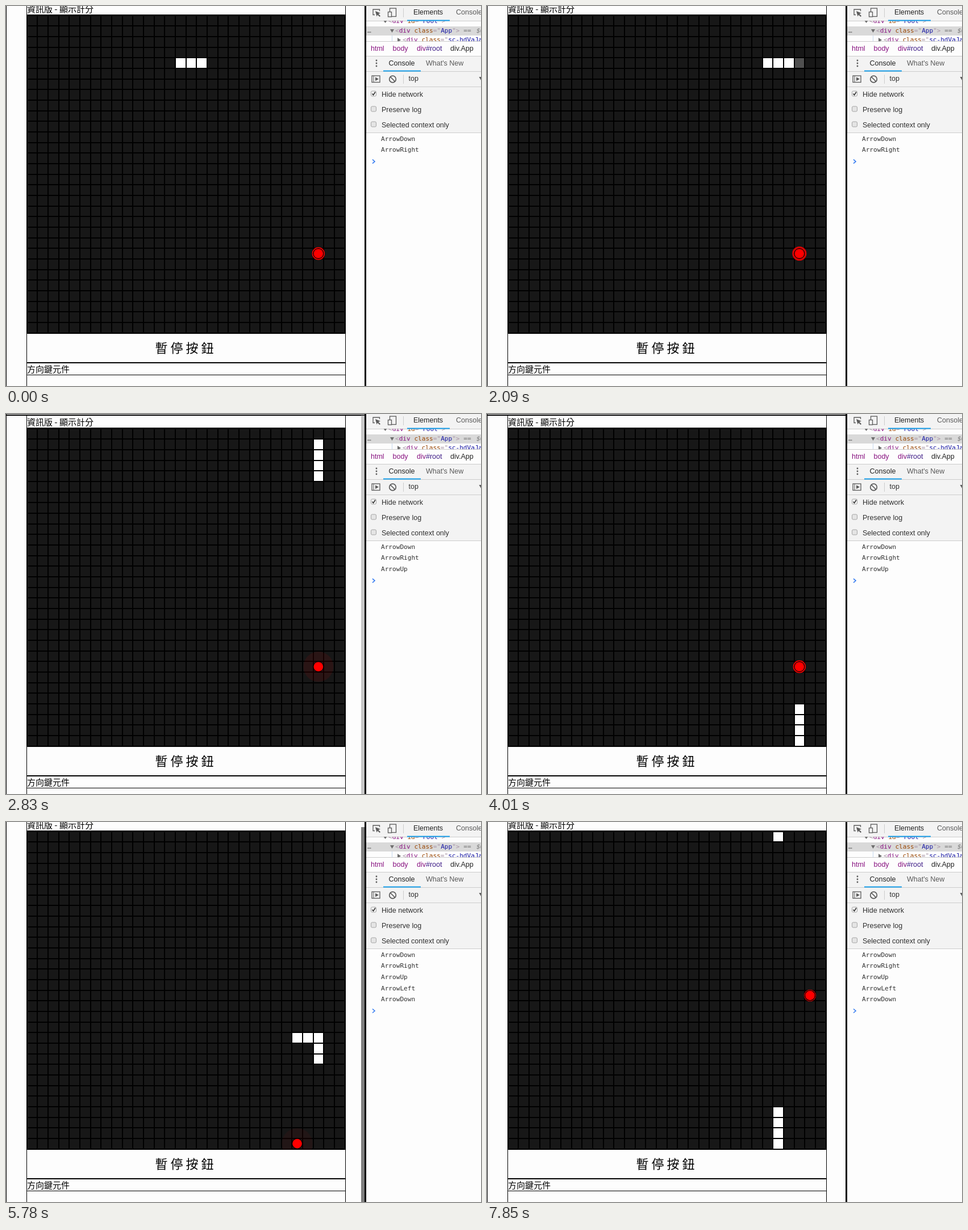
These frames come from a looping animation (836x670 px, 8 s). An HTML page with a canvas:

```html
<!DOCTYPE html>
<html lang="zh-Hant">
<head>
<meta charset="utf-8">
<title>Snake board</title>
<style>
html, body { margin: 0; width: 100%; height: 100%; overflow: hidden; background: #fdfdfd; }
canvas { display: block; }
</style>
</head>
<body>
<canvas id="stage" width="836" height="670"></canvas>
<script>
const ctx = document.getElementById('stage').getContext('2d');
const LOOP = 8000, FRAME = 148.2;
const PAPER = '#fdfdfd', BAR = '#f3f3f3', EDGE = '#cccccc', INK = '#5a5a5a', BLUE = '#1a9fea';
const CJK = '"Noto Sans CJK TC", "Noto Sans CJK", "Noto Sans CJK JP", sans-serif';
const UI = '12.5px "Liberation Sans", Arial, sans-serif';
const MONO = '11.1px "DejaVu Sans Mono", monospace';

// Board geometry
const CELL = 560 / 30, LEFT = 36.5, TOP = 25.5, SCROLL = 9;

// Key presses: time, console text and the page scroll they cause
const KEYS = [
  { at: -2, text: 'ArrowDown' },
  { at: -1, text: 'ArrowRight' },
  { at: 2200, text: 'ArrowUp', scroll: 0 },
  { at: 5160, text: 'ArrowLeft' },
  { at: 5600, text: 'ArrowDown', scroll: SCROLL }
];
const FOODS = [
  { at: -100, col: 27, row: 22 },
  { at: 4825, col: 25, row: 29 },
  { at: 7795, col: 28, row: 15 }
];
// Game tick at a given time, linear between these points
const TICKS = [[0, 0], [10, 2060], [25, 4990], [39, 7795]];

function rect(x, y, w, h, color) {
  ctx.fillStyle = color;
  ctx.fillRect(x, y, w, h);
}

function disc(x, y, r, color) {
  ctx.fillStyle = color;
  ctx.beginPath();
  ctx.arc(x, y, r, 0, Math.PI * 2);
  ctx.fill();
}

function text(str, x, y, font, color) {
  ctx.font = font;
  ctx.fillStyle = color;
  ctx.fillText(str, x, y);
  return x + ctx.measureText(str).width;
}

function spans(x, y, font, parts) {
  for (const [str, color] of parts) x = text(str, x, y, font, color);
}

function line(points, color, width = 1.3, fill = false) {
  ctx.beginPath();
  points.forEach(([x, y], i) => i ? ctx.lineTo(x, y) : ctx.moveTo(x, y));
  if (fill) {
    ctx.fillStyle = color;
    ctx.fill();
  } else {
    ctx.strokeStyle = color;
    ctx.lineWidth = width;
    ctx.stroke();
  }
}

function outline(x, y, w, h, color, width = 1.3) {
  ctx.strokeStyle = color;
  ctx.lineWidth = width;
  ctx.strokeRect(x, y, w, h);
}

function clipped(x, y, w, h, draw) {
  ctx.save();
  ctx.beginPath();
  ctx.rect(x, y, w, h);
  ctx.clip();
  draw();
  ctx.restore();
}

function tickAt(t) {
  let i = 1;
  while (i < TICKS.length - 1 && t >= TICKS[i][1]) i++;
  const [k0, t0] = TICKS[i - 1], [k1, t1] = TICKS[i];
  const step = (t1 - t0) / (k1 - k0);
  const k = Math.min(39, k0 + Math.floor((t - t0) / step + 1e-6));
  return { k, age: t - t0 - (k - k0) * step };
}

// Head position on tick k; the upward wrap spends one tick on hidden row 30
function headAt(k) {
  if (k <= 10) return [17 + k, 4];
  if (k <= 14) return [27, 14 - k];
  if (k <= 26) return [27, 45 - k];
  if (k <= 28) return [53 - k, 19];
  return [25, (k - 9) % 30];
}

function cell(col, row, top, color) {
  const x = Math.round(LEFT + col * CELL) + 1, y = Math.round(top + row * CELL) + 1;
  const right = Math.round(LEFT + (col + 1) * CELL) - 1;
  const bottom = Math.round(top + (row + 1) * CELL) - 1;
  rect(x, y, right - x, bottom - y, color);
}

function drawFood(t, top) {
  const food = FOODS.filter(f => f.at <= t).pop();
  const phase = (t - food.at) / 1000 % 1;
  const x = LEFT + (food.col + 0.5) * CELL, y = top + (food.row + 0.5) * CELL;
  const r = CELL / 2;
  ctx.fillStyle = `rgba(255,0,0,${1 - phase})`;
  ctx.beginPath();
  ctx.arc(x, y, r + CELL * phase, 0, Math.PI * 2);
  ctx.arc(x, y, r, 0, Math.PI * 2, true);
  ctx.fill();
  disc(x, y, r, '#000');
  disc(x, y, r - 1, '#f00');
}

function drawSnake(t, top) {
  const { k, age } = tickAt(t);
  const size = k < 25 ? 4 : 5;
  for (let i = 0; i < size; i++) {
    const [col, row] = headAt(k - i);
    if (row > 29) continue;
    const alpha = i ? 1 : Math.min(1, age / 60);
    cell(col, row, top, `rgba(255,255,255,${alpha})`);
  }
}

function drawPage(t, scroll) {
  const top = TOP - scroll;
  rect(0, 0, 1, 670, '#000');
  rect(0, 1 - scroll, 632, 2, '#000');
  rect(36, 1 - scroll, 1, 670, '#000');
  rect(597, 1 - scroll, 1, 680, '#000');
  rect(36, 24 - scroll, 562, 563, '#000');
  rect(36, 637 - scroll, 562, 2, '#000');
  rect(36, 659 - scroll, 562, 1, '#000');
  rect(36, 660 - scroll, 1, 20, '#000');

  text('資訊版 - 顯示計分', 37, 14.5 - scroll, '15px ' + CJK, '#000');
  text('方向鍵元件', 37, 649 - scroll, '15px ' + CJK, '#000');
  ctx.letterSpacing = '5px';
  text('暫停按鈕', 262.5, 612 - scroll, '22px ' + CJK, '#000');
  ctx.letterSpacing = '0px';

  clipped(36, top, 561, 561, () => {
    for (let n = 0; n < 900; n++) cell(n % 30, Math.floor(n / 30), top, '#171717');
    drawFood(t, top);
    drawSnake(t, top);
  });
}

function drawScrollbar(t, key) {
  if (!key) return;
  const alpha = Math.min(1, Math.max(0, 1 - (t - key.at - 500) / 200));
  const y = key.scroll;
  rect(625, y, 7, 670 - y, `rgba(127,127,127,${alpha})`);
}

function checkbox(y, label, checked) {
  ctx.fillStyle = checked ? '#f4f4f4' : '#e4e4e4';
  ctx.beginPath();
  ctx.roundRect(642.5, y - 6.5, 9, 9, 2);
  ctx.fill();
  ctx.strokeStyle = '#a5a5a5';
  ctx.lineWidth = 1;
  ctx.stroke();
  if (checked) line([[644.5, y - 2], [646.5, y + 0.5], [650, y - 5]], '#333', 1.6);
  text(label, 661, y, UI, '#303030');
}

function drawElements() {
  const TAG = '#881280', ATTR = '#994500', VALUE = '#1a1aa6', QUOTE = '#a894a6';
  const open = (attr, value) => [
    ['<', QUOTE], ['div', TAG], [' ' + attr, ATTR], ['="', QUOTE], [value, VALUE], ['"', QUOTE]
  ];
  clipped(634, 26, 202, 36, () => {
    rect(634, 36, 202, 16, '#d9d9d9');
    line([[664, 25], [671, 25], [667.5, 30]], '#6e6e6e', 1, true);
    spans(673, 27.5, MONO, [...open('id', 'root'), ['>', QUOTE]]);
    text('…', 636, 44, MONO, '#555');
    line([[676, 41], [683, 41], [679.5, 47]], '#6e6e6e', 1, true);
    spans(685, 44, MONO, [...open('class', 'App'), ['>', QUOTE], [' == ', '#777']]);
    text('$0', 828, 44, 'italic ' + MONO, '#777');
    rect(679, 52, 1, 10, '#c6d9ee');
    line([[689, 56], [695, 60], [689, 64]], '#6e6e6e', 1, true);
    spans(698, 60.5, MONO, open('class', 'sc-hdVaJa'));
  });
}

function drawIcons() {
  // Element picker
  line([[649, 15.5], [646, 15.5], [646, 6], [657.5, 6], [657.5, 9]], INK);
  line([[650, 9], [659, 12.5], [655.5, 14], [659, 17.5], [657.5, 19], [654, 15.5], [652.5, 18.5]], INK, 1, true);
  // Device toggle
  outline(675.5, 4, 11, 14.5, INK);
  rect(672, 10, 7, 10, BAR);
  outline(672.5, 10.5, 6, 8.5, INK);
  rect(699, 4, 1, 16, EDGE);
  // Drawer menu
  for (const y of [96, 101, 106]) disc(652, y, 1.4, INK);
  // Console sidebar and clear
  outline(644, 123, 14, 11.5, INK);
  rect(646.5, 123, 1, 12, INK);
  line([[650, 125.5], [656, 128.8], [650, 132]], INK, 1, true);
  ctx.strokeStyle = INK;
  ctx.lineWidth = 1.7;
  ctx.beginPath();
  ctx.arc(680.5, 129, 5.8, 0, Math.PI * 2);
  ctx.stroke();
  line([[676.5, 125], [684.5, 133]], INK, 1.7);
  rect(699, 121, 1, 16, EDGE);
  line([[832.5, 125], [839.5, 125], [836, 131]], INK, 1, true);
}

function drawTools(t) {
  rect(634, 0, 202, 670, PAPER);
  rect(634, 0, 202, 26, BAR);
  rect(634, 88, 202, 135, BAR);
  for (const y of [26, 62, 88, 115, 142, 223]) rect(634, y, 202, 1, EDGE);
  drawElements();
  drawIcons();

  text('Elements', 717, 12, UI, '#222');
  text('Console', 792, 12, UI, INK);
  rect(706, 24.5, 75, 2, BLUE);
  text('html', 642, 75.5, UI, '#881280');
  text('body', 680.5, 75.5, UI, '#881280');
  spans(723, 75.5, UI, [['div', '#881280'], ['#root', '#3d1a86']]);
  text('div.App', 782, 75.5, UI, '#222');
  text('Console', 673.5, 101.5, UI, '#222');
  text("What's New", 739, 101.5, UI, INK);
  rect(664, 113.5, 66, 2, BLUE);
  text('top', 708.5, 129, UI, '#303030');
  checkbox(156.5, 'Hide network', true);
  checkbox(183.5, 'Preserve log', false);
  checkbox(210.5, 'Selected context only', false);

  const log = KEYS.filter(key => key.at <= t);
  log.forEach((key, i) => text(key.text, 660, 235 + i * 19.6, MONO, '#303030'));
  const y = 235 + log.length * 19.6;
  line([[645, y - 3.5], [649, y], [645, y + 3.5]], '#367cf1', 1.6);
  rect(631, 0, 3, 670, '#000');
}

function render(now) {
  const t = Math.floor((now % LOOP + 5) / FRAME) * FRAME;
  const lastScroll = KEYS.filter(key => key.at <= t && 'scroll' in key).pop();
  ctx.textBaseline = 'middle';
  rect(0, 0, 836, 670, PAPER);
  drawPage(t, lastScroll ? lastScroll.scroll : SCROLL);
  drawScrollbar(t, lastScroll);
  drawTools(t);
}

const start = performance.now();
function loop() {
  render(performance.now() - start);
  requestAnimationFrame(loop);
}
loop();
</script>
</body>
</html>
```
